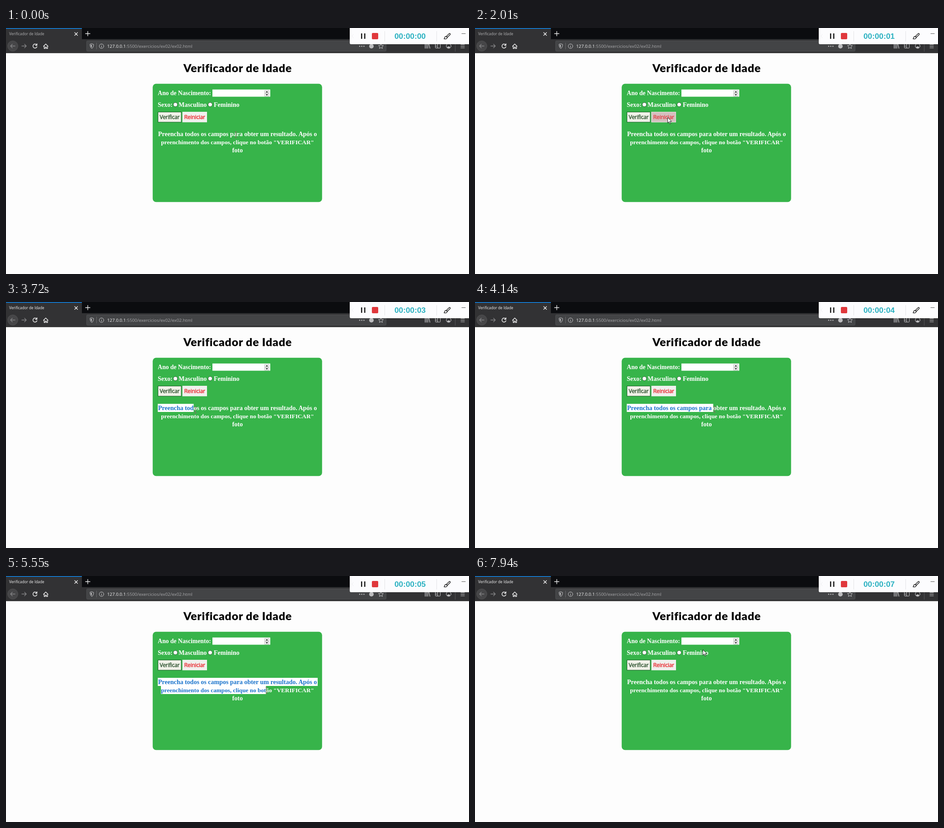
These frames come from a looping animation (1025 by 546 pixels, 7.99 s). An HTML page:

```html
<!DOCTYPE html>
<html lang="pt">
<head>
<meta charset="utf-8">
<title>Verificador de Idade</title>
<style>
html, body { margin: 0; width: 100%; height: 100%; overflow: hidden; background: #fdfdfd; }
svg { display: block; width: 1025px; height: 546px; }
text { white-space: pre; }
.ui { font-family: "Open Sans", "Noto Sans", sans-serif; }
.serif { font: bold 14px "Liberation Serif", serif; }
.title { font: 900 25px Lato, sans-serif; letter-spacing: .7px; }
.button { font: 12.2px "Open Sans", "Noto Sans", sans-serif; letter-spacing: -.3px; stroke-width: .25; }
.clock { font: bold 17.3px "Liberation Sans", sans-serif; }
.line { fill: none; stroke-linecap: round; stroke-linejoin: round; }
</style>
</head>
<body>
<svg viewBox="0 0 1025 546">
  <defs>
    <clipPath id="picked"><rect id="clip1" x="336" y="226" height="18"/><rect id="clip2" x="343" y="244" height="18"/></clipPath>
    <g id="note" class="serif" text-anchor="middle">
      <text id="row1" x="512.5" y="240">Preencha todos os campos para obter um resultado. Após o</text>
      <text id="row2" x="512.5" y="258" style="font-size:13.25px">preenchimento dos campos, clique no botão "VERIFICAR"</text>
      <text x="512.5" y="276">foto</text>
    </g>
  </defs>

  <!-- browser bar -->
  <rect width="1025" height="25" fill="#0b0c0f"/>
  <rect y="24.75" width="1025" height="30.75" fill="#323234"/>
  <rect width="168" height="25" fill="#323234"/>
  <rect width="168" height="1.6" fill="#0a84e8"/>
  <rect y="54.75" width="1025" height=".75" fill="#1c1c1e"/>
  <text id="tab" class="ui" x="7" y="16.3" font-size="8.3">Verificador de Idade</text>
  <g class="line" stroke="#f2f2f2" stroke-width="1.3">
    <path d="M152 10l6.5 6.5M158.5 10l-6.5 6.5M176 12.5h10M181 7.5v10"/>
    <circle cx="15" cy="40" r="11.5" fill="#464648" stroke="#555557" stroke-width=".7"/>
    <path stroke="#858587" d="M20 40H10m4-4l-4 4 4 4M35 40h10m-4-4l4 4-4 4"/>
    <path stroke-width="1.5" d="M67.5 37a4.5 4.5 0 1 0 1 4.5M68.5 35v3.5H65"/>
    <path stroke-width="1.4" d="M83 40.5l5-5 5 5M84.5 40v5.5h2.5v-3h2.5v3h2.5V40"/>
  </g>
  <rect x="178.5" y="28.5" width="663" height="23" rx="2" fill="#434446" stroke="#4e4f51"/>
  <g class="line" stroke="#c9c9cb">
    <path d="M190 35l4 1.5c0 4-1 7-4 9-3-2-4-5-4-9z"/>
    <path fill="#c9c9cb" stroke="none" d="M190 37v6.5c-1.7-1.4-2.3-3.5-2.4-5.8z"/>
    <path stroke="#69696b" d="M200.5 33v14"/>
    <circle cx="211.5" cy="40.3" r="5"/>
    <path d="M211.5 40v3M211.5 37.7v.1"/>
    <path d="M830 35l1.6 3.6 3.9.4-2.9 2.6.8 3.9-3.4-2-3.4 2 .8-3.9-2.9-2.6 3.9-.4z"/>
    <path stroke-width="1.3" d="M928 35v10M931 35v10M934 35v10M936 35l2.5 10"/>
    <rect x="950.5" y="35.5" width="11" height="9" rx="1"/>
    <path d="M955.5 36v8M952 39h1.5M952 41.5h1.5"/>
    <circle cx="980" cy="40" r="5.3"/>
    <path fill="#c9c9cb" d="M977 43c1-2 5-2 6 0-2 1.6-4 1.6-6 0z"/>
    <path stroke="#555557" d="M994.5 29v23"/>
    <path stroke-width="1.2" d="M1007 37h8M1007 40.5h8M1007 44h8"/>
  </g>
  <g fill="#bdbdbf">
    <circle cx="783" cy="40.5" r="1.3"/><circle cx="787.7" cy="40.5" r="1.3"/><circle cx="792.4" cy="40.5" r="1.3"/>
    <circle cx="809" cy="40.5" r="5"/>
  </g>
  <text class="ui" x="224" y="44" font-size="9.8" fill="#a9a9ab"><tspan fill="#f5f5f5">127.0.0.1</tspan>:5500/exercicios/ex02/ex02.html</text>

  <!-- recorder -->
  <path d="M761 0h264v36H764a3 3 0 0 1-3-3z" fill="#fcfcfe"/>
  <path d="M769 14l-3 4 3 4" class="line" stroke="#eeeef1"/>
  <path d="M786 12h2.5v12h-2.5zM793 12h2.5v12h-2.5z" fill="#151515"/>
  <rect x="810" y="11" width="14" height="14" rx="2" fill="#e0383c"/>
  <path d="M838.5 7v23M953.5 7v23" stroke="#e2e2e6"/>
  <text id="clock" class="clock" x="860" y="24.3" fill="#2bb1c1"></text>
  <g class="line" stroke="#1c1c1c" stroke-width="1.4">
    <path d="M975 18.5l6-6c1.5-1.2 3.5.5 2.2 2.2l-6 6zM974.5 18.8c-2-.3-3.5 1-3.3 3-.1 1-.8 1.700-1.500 2 3 1.300 7 .5 7-3z"/>
    <path stroke="#555" stroke-width="1.2" d="M1009 12.5h8"/>
  </g>

  <!-- page -->
  <text class="title" x="512.8" y="98" text-anchor="middle" fill="#080808">Verificador de Idade</text>
  <rect x="324.75" y="123.75" width="375" height="262.5" rx="7.5" fill="#37b44a"/>
  <g class="serif" fill="#fff">
    <text x="336" y="149" style="font-size:13.7px">Ano de Nascimento:</text>
    <text x="336" y="174.5">Sexo:</text>
    <text x="382" y="174.5">Masculino</text>
    <text x="460" y="174.5">Feminino</text>
  </g>
  <rect x="457" y="136.5" width="128" height="16" fill="#fff"/>
  <path d="M572.5 138.5h10v6h-10zM572.5 145.500h10v6h-10z" fill="#ededed" stroke="#b9b9b9" stroke-width=".8"/>
  <path d="M575 143l2.5-3 2.5 3zM575 147l2.5 3 2.5-3z" fill="#222"/>
  <g fill="#fff" stroke="#3c5c42"><circle cx="375" cy="170" r="4.6"/><circle cx="452" cy="170" r="4.6"/></g>
  <rect x="336.5" y="186.5" width="51.5" height="22.5" fill="#f0f1e8" stroke="#155c22"/>
  <text class="button" x="362.2" y="202.4" text-anchor="middle" fill="#123d16" stroke="#123d16">Verificar</text>
  <rect x="390.5" y="186" width="54.5" height="23.25" fill="#f0f0ee"/>
  <rect id="hover" x="391" y="186.5" width="53.5" height="22.25" fill="#d5bfbf" stroke="#eadede"/>
  <text id="reset" class="button" x="417.6" y="202.4" text-anchor="middle" fill="#e80810" stroke="#e80810">Reiniciar</text>

  <use href="#note" fill="#fff"/>
  <g clip-path="url(#picked)">
    <rect x="336" y="226" width="354" height="36" fill="#fff"/>
    <use href="#note" fill="#1b74cc"/>
  </g>

  <path id="arrow" d="M.5.5v12.3l2.800-2.700 2 4.700 2-.9-2-4.500h3.900z" fill="#fff" stroke="#111" stroke-width=".9"/>
  <path id="beam" class="line" d="M-2-6.5h1.5l.5.5.5-.5H2M0-6V6M-2 6.5h1.5L0 6l.5.5H2" stroke="#a8506e" stroke-width=".9" opacity=".8"/>
</svg>
<script>
const LOOP = 7990;
const $ = id => document.getElementById(id);

// pointer path: time, x, y
const path = [
  [0, 509, 237], [130, 509, 237], [600, 462, 286], [770, 462, 286],
  [1070, 435, 292], [1540, 428, 238], [1800, 427, 204], [2010, 426, 198],
  [2350, 422, 203], [2800, 375, 240], [3160, 347, 237], [3330, 338, 236],
  [3500, 338, 236], [3720, 419, 240], [4270, 564, 238], [4650, 663, 237],
  [4800, 688, 239], [5080, 346, 256], [5680, 640, 253], [5900, 640, 253],
  [6190, 614, 331], [6410, 614, 331], [6530, 627, 287], [6790, 627, 287],
  [7300, 690, 271], [7600, 690, 271], [7940, 504, 163], [LOOP, 504, 163]
];

function pointAt(t) {
  const i = Math.max(1, path.findIndex(p => p[0] >= t));
  const [t0, x0, y0] = path[i - 1], [t1, x1, y1] = path[i];
  const k = (t - t0) / (t1 - t0);
  return [x0 + (x1 - x0) * k, y0 + (y1 - y0) * k];
}

const clamp = v => Math.min(1, Math.max(0, v));

// last glyph edge whose letter centre lies left of x
function snap(row, x) {
  let edge = row.getStartPositionOfChar(0).x;
  for (let i = 0; i < row.getNumberOfChars(); i++) {
    const end = row.getEndPositionOfChar(i).x;
    if ((edge + end) / 2 > x) break;
    edge = end;
  }
  return edge;
}

function select(t, x, y) {
  let first = 0, second = 0;
  if (t >= 3500 && t < 6790) {
    const inRow2 = t > 4800 && y > 244;
    first = inRow2 ? 354 : snap($("row1"), x - 3) - 336;
    if (t >= 5680) x = 640;
    if (inRow2) second = snap($("row2"), x - 3) - 343;
  }
  $("clip1").setAttribute("width", Math.max(0, first));
  $("clip2").setAttribute("width", Math.max(0, second));
}

function draw(now) {
  const t = now % LOOP;
  const [x, y] = pointAt(t);
  const overNote = x > 335 && x < 690 && y > 226 && y < 281;
  $("arrow").style.display = overNote ? "none" : "";
  $("beam").style.display = overNote ? "" : "none";
  for (const id of ["arrow", "beam"]) $(id).setAttribute("transform", `translate(${x} ${y})`);

  const glow = clamp((t - 1760) / 200) * clamp((2640 - t) / 200);
  $("hover").setAttribute("opacity", glow);
  $("reset").setAttribute("opacity", 1 - 0.2 * glow);

  const seconds = Math.max(0, Math.floor((t - 120) / 1000));
  $("clock").textContent = "00:00:0" + seconds;
  $("tab").setAttribute("fill", t < 3500 ? "#b4b4b6" : "#f7f7f7");
  select(t, x, y);
}

function tick() {
  draw(performance.now());
  requestAnimationFrame(tick);
}
tick();
</script>
</body>
</html>
```
